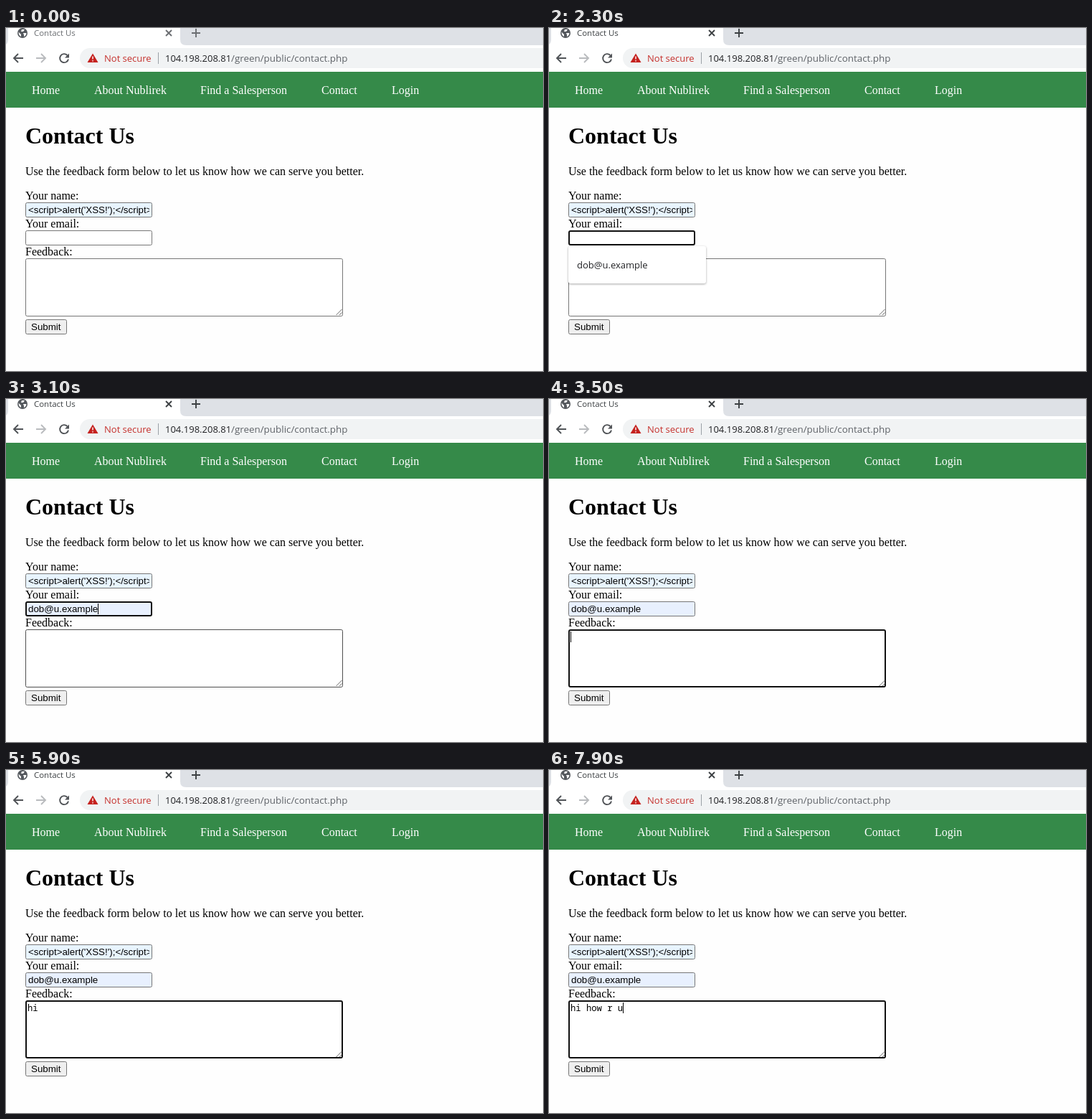
An HTML page that plays this animation: 749x478 px, repeating every 8000 ms.

```html
<!DOCTYPE html>
<html lang="en">
<head>
<meta charset="utf-8">
<title>Contact Us</title>
<style>
  html, body { margin: 0; height: 100%; overflow: hidden; background: #fefefe; }
  svg { display: block; }
  text { white-space: pre; }
  .ui { font-family: "Open Sans", "Noto Sans", sans-serif; font-size: 13px; }
  .page { font-family: "Liberation Serif", "Times New Roman", serif; font-size: 16px; }
  .form { font-family: "Liberation Sans", Arial, sans-serif; font-size: 13.333px; }
  .mono { font-family: "Noto Sans Mono", "DejaVu Sans Mono", monospace; font-size: 12.2px; }
  .line { fill: none; stroke-width: 1.9; }
  .box { fill: #fff; stroke: #767676; }
  .box.hover { stroke: #4f4f4f; }
  .box.focus { stroke: #101010; stroke-width: 2; }
  #chrome { --ink: #6b6e72; }
  #chrome.active { --ink: #3c4043; }
  #popup { filter: drop-shadow(0 1px 1.5px rgba(0, 0, 0, .35)); }
</style>
</head>
<body>
<svg width="749" height="478" viewBox="0 0 749 478">
  <defs><clipPath id="nameClip"><rect x="29" y="245" width="171" height="17"/></clipPath></defs>

  <g id="chrome" class="ui">
    <rect width="749" height="24" fill="#dee1e6"/>
    <path d="M3 0V16Q3 24 -5 24H251Q243 24 243 16V0Z" fill="#fff"/>
    <rect y="24" width="749" height="37" fill="#fff"/>
    <circle cx="23" cy="7" r="7" fill="#55595e"/>
    <path d="M17.5 5.5L21 9V12Q17.5 10.5 17.5 5.5M22 2H26L24 5H21ZM24 7H28.5Q28 11 25 12V9.500Z" fill="#fff"/>
    <text x="39" y="11" font-size="11.45" fill="var(--ink)">Contact Us</text>
    <path class="line" stroke="var(--ink)" stroke-width="1.7" d="M223 3L231 11M231 3L223 11M259 7H271M265 1V13"/>
    <path class="line" stroke="#505357" d="M24 42H11M17 36L11 42L17 48"/>
    <path class="line" stroke="#b9bbbe" d="M42 42H55M49 36L55 42L49 48"/>
    <path class="line" stroke="#505357" d="M85.500 38A6 6 0 1 0 87 43.500"/>
    <path d="M88 35.500V41.500H82Z" fill="#505357"/>
    <rect x="103" y="28" width="680" height="28" rx="14" fill="#f1f3f4"/>
    <path d="M121 35.500L128.500 48H113.500Z" fill="#c5221f"/>
    <path d="M121 39.500V43.500M121 45V46.500" stroke="#fff" stroke-width="1.400"/>
    <text x="137" y="47" fill="#c5302c">Not secure</text>
    <rect x="212" y="34" width="1" height="16" fill="#9aa0a6"/>
    <text x="222" y="47" fill="#202124">104.198.208.81</text>
    <text x="314" y="47" font-size="13" fill="#5f6368" style="font-size:13.4px">/green/public/contact.php</text>
  </g>

  <g class="page">
    <rect y="61" width="749" height="50" fill="#358a49"/>
    <g fill="#fff">
      <text x="36" y="92">Home</text>
      <text x="123" y="92">About Nublirek</text>
      <text x="271" y="92">Find a Salesperson</text>
      <text x="440" y="92">Contact</text>
      <text x="538" y="92">Login</text>
    </g>
    <text x="27" y="161" style="font-size:32px;font-weight:bold">Contact Us</text>
    <text x="27" y="205">Use the feedback form below to let us know how we can serve you better.</text>
    <text x="27" y="239">Your name:</text>
    <text x="27" y="278">Your email:</text>
    <text x="27" y="317">Feedback:</text>
  </g>

  <g class="form">
    <rect id="name" class="box" style="fill:#e8f4fe"/>
    <text x="31" y="258" clip-path="url(#nameClip)">&lt;script&gt;alert('XSS!');&lt;/script&gt;</text>
    <rect id="email" class="box"/>
    <text id="emailText" x="31" y="297"></text>
    <rect id="feedback" class="box"/>
    <path d="M460.500 400L468.500 392M465 400L468.500 396.500" stroke="#666"/>
    <text id="typed" class="mono" x="30" y="336"></text>
    <rect x="27.500" y="406.500" width="57" height="20" rx="2" fill="#efefef" stroke="#767676"/>
    <text x="35" y="421">Submit</text>
  </g>

  <g id="popup" class="ui">
    <rect x="27" y="304" width="192" height="52" rx="3" fill="#fff"/>
    <rect id="option" x="27" y="312" width="192" height="36" fill="#c8c8c8"/>
    <text id="suggestion" x="39" y="335" font-weight="500" fill="#202124"></text>
  </g>
  <rect id="caret" width="1" height="15"/>
</svg>

<script>
const LOOP = 8000;
const EMAIL = 'dob@u.example';
const MESSAGE = 'hi how r u';
// [time, characters typed]
const KEYS = [[5500, 1], [5700, 2], [6500, 4], [6900, 6], [7300, 7], [7500, 8], [7700, 9], [7900, 10]];
// [from, to] spans in which the caret is lit
const LIT = [[500, 1100], [1700, 2300], [2700, 3900], [4700, 4900], [5500, 5900], [6500, LOOP]];
const FIELDS = {
  name: { y: 243, w: 177, h: 21, focus: [500, 2100], hover: [300, 500] },
  email: { y: 282, w: 177, h: 21, focus: [2100, 3500], hover: [1700, 2100], rehover: [4300, 4700] },
  feedback: { y: 321, w: 443, h: 81, focus: [3500, LOOP], hover: [3100, 3500] }
};

const $ = id => document.getElementById(id);
const within = (t, span) => !!span && t >= span[0] && t < span[1];
const show = (id, on) => $(id).setAttribute('visibility', on ? 'visible' : 'hidden');
const set = (id, attrs) => {
  for (const key in attrs) $(id).setAttribute(key, attrs[key]);
};

function drawField(id, t) {
  const { y, w, h, focus, hover, rehover } = FIELDS[id];
  const focused = within(t, focus);
  const hovered = within(t, hover) || within(t, rehover);
  const inset = focused ? 1 : 0.5;
  set(id, {
    class: 'box' + (focused ? ' focus' : hovered ? ' hover' : ''),
    x: 27 + inset, y: y + inset, width: w - 2 * inset, height: h - 2 * inset, rx: 2
  });
}

function caretPosition(t, text) {
  if (t < 2100) return [109, 246];
  if (t < 3100) return [31, 285];
  if (t < 3500) return [31 + Math.round($('emailText').getComputedTextLength()), 285];
  return [30 + Math.round(7.33 * text.length) - (text.endsWith(' ') ? 1 : 0), 324];
}

function draw(t) {
  $('chrome').classList.toggle('active', t >= 500);
  Object.keys(FIELDS).forEach(id => drawField(id, t));

  const filled = t >= 2700;
  $('email').style.fill = filled ? '#e8f0fe' : '#fff';
  $('emailText').textContent = filled ? EMAIL : '';
  show('popup', within(t, [2100, 3100]));
  show('option', within(t, [2700, 3100]));

  const typed = KEYS.filter(([time]) => t >= time).pop();
  const text = MESSAGE.slice(0, typed ? typed[1] : 0);
  $('typed').textContent = text;

  const [x, y] = caretPosition(t, text);
  set('caret', { x, y });
  show('caret', LIT.some(span => within(t, span)));
}

$('suggestion').textContent = EMAIL;
const start = performance.now();
function tick() {
  draw((performance.now() - start) % LOOP);
  requestAnimationFrame(tick);
}
tick();
</script>
</body>
</html>
```
